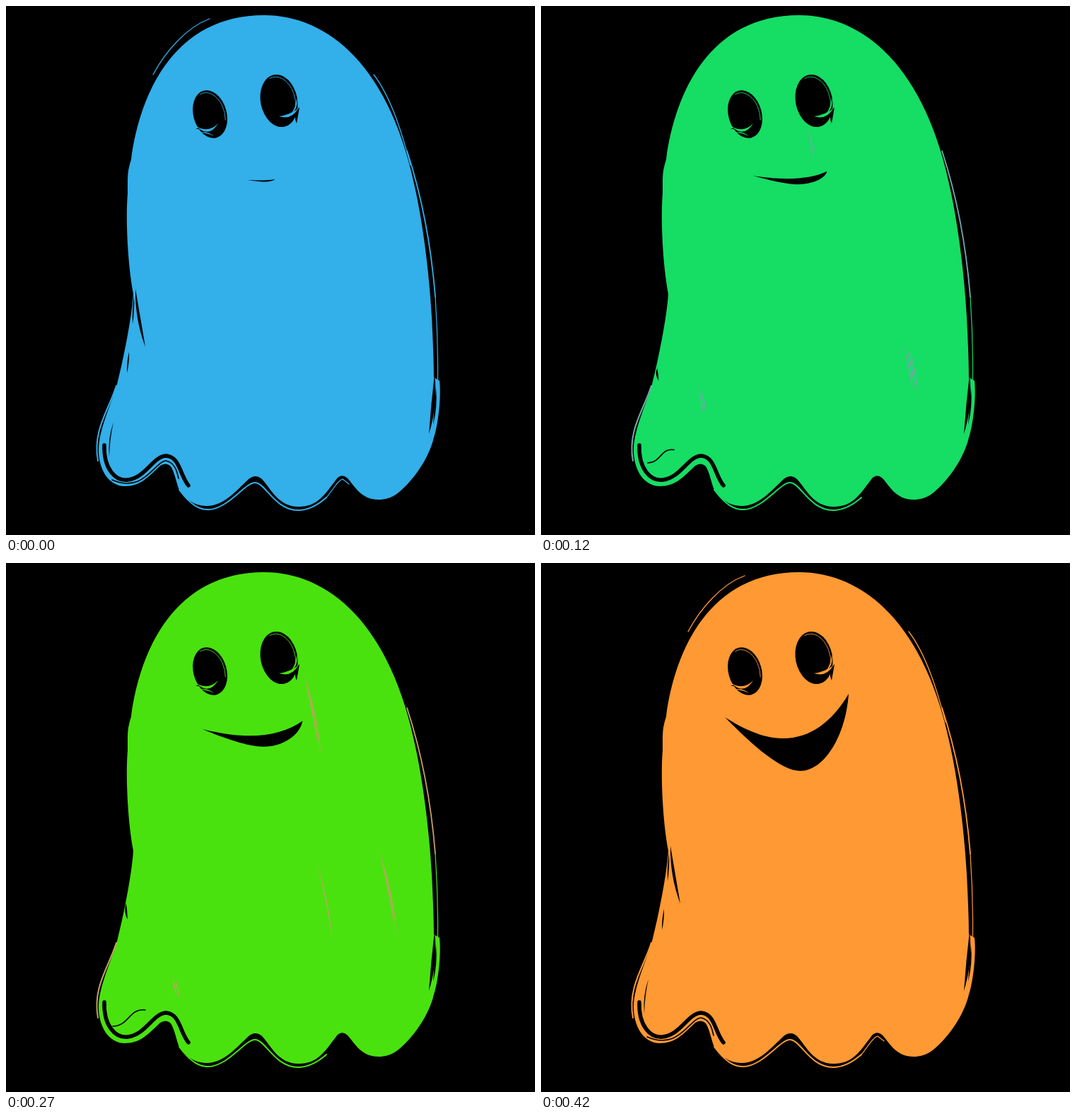
An HTML page with a canvas for the animation above (0.45 s loop, 748 px wide and 748 px high).

```html
<!DOCTYPE html>
<html lang="en">
<head>
<meta charset="utf-8">
<title>Ghost</title>
<style>
html, body { margin: 0; width: 100%; height: 100%; overflow: hidden; background: #000; }
canvas { display: block; }
</style>
</head>
<body>
<canvas id="stage" width="748" height="748"></canvas>
<script>
const ctx = document.getElementById('stage').getContext('2d');
const STEP = 30, STEPS = 15, HALF = 7;
const BLUE = [51, 175, 233], GREEN = [0, 255, 0], ORANGE = [255, 153, 51], INK = '#000';

const body = new Path2D(`M365 13C455 13 545 85 580 265
  C591 318 599 385 602 440C604 480 605 505 605 525L613 530
  C616 560 609 600 605 610C598 640 575 672 555 688C545 696 535 698 527 698
  C500 698 492 676 482 667Q475 661 468 668C450 692 440 708 414 708
  C385 708 375 683 362 669Q353 661 343 669C327 684 308 707 284 707
  C262 707 250 692 244 682C240 670 237 655 232 650Q226 645 218 650
  C200 667 190 679 168 679C145 679 131 655 131 628C131 600 148 565 157 535
  C166 500 178 440 180 407C172 365 169 300 172 265L172 245Q172 232 177 217
  C190 120 240 13 365 13Z`);
const tailFold = new Path2D('M139 621C138 655 155 672 172 670C198 667 208 636 227 636C246 638 246 664 258 678');
const hemEcho = new Path2D('M245 684C262 707 274 712 286 712C313 712 338 674 352 674C367 674 380 713 413 713C430 713 445 702 453 695');
const sideEcho = new Path2D('M567 205C590 275 602 350 607 411');
const lowSideEcho = new Path2D('M607 411C611 470 612 540 608 575');
const tailEcho = new Path2D('M156 537C146 570 122 600 130 643');
const crownEcho = new Path2D('M288 18C255 30 225 65 208 97M520 97C545 130 560 180 572 225');
const hemEnd = new Path2D('M453 695C462 684 470 670 476 669L485 676');
const innerFold = new Path2D('M150 670C195 690 210 644 226 643C240 646 242 660 244 668');

// Each sketch holds from its step: a crease height, a tail curl and
// bundles of streaks (x, y, length, strands).
const sketches = [
  { from: 2, crease: 512, curl: 37, streaks: [[377, 172, 48, 1], [222, 540, 38, 2], [513, 482, 60, 3]] },
  { from: 5, crease: 428, curl: 58, streaks: [[516, 188, 165, 2], [528, 278, 170, 1], [555, 272, 172, 3]] },
  { from: 9, crease: 481, curl: 46, streaks: [[420, 155, 110, 2], [527, 405, 112, 2], [440, 425, 110, 1], [235, 585, 28, 2]] },
  { from: 11, crease: 537, curl: 24, streaks: [[318, 120, 44, 2], [208, 495, 46, 2]] }
];

const mouthPoses = [
  { left: [341, 246], right: [380, 245], upper: 246.5, lower: 248.5 },
  { left: [285, 238], right: [413, 230], upper: 243.5, lower: 253.5 },
  { left: [260, 218], right: [435, 185], upper: 248, lower: 294 }
];

const mix = (a, b, k) => a + (b - a) * k;
const mixColor = (a, b, k) => `rgb(${a.map((v, i) => Math.round(mix(v, b[i], k))).join()})`;

function seeded(seed) {
  return () => {
    const v = Math.sin(++seed * 12.9898) * 43758.5453;
    return v - Math.floor(v);
  };
}

function line(path, color, width) {
  ctx.strokeStyle = color;
  ctx.lineWidth = width;
  ctx.stroke(path);
}

// Curved stroke that tapers to a point at both ends.
function slash(x1, y1, x2, y2, width, bend, color) {
  const len = Math.hypot(x2 - x1, y2 - y1);
  const nx = (y1 - y2) / len, ny = (x2 - x1) / len;
  const mx = (x1 + x2) / 2, my = (y1 + y2) / 2;
  const out = 2 * bend + width, back = 2 * bend - width;
  ctx.fillStyle = color;
  ctx.beginPath();
  ctx.moveTo(x1, y1);
  ctx.quadraticCurveTo(mx + nx * out, my + ny * out, x2, y2);
  ctx.quadraticCurveTo(mx + nx * back, my + ny * back, x1, y1);
  ctx.fill();
}

function drawEye(x, y, rx, ry, turn, color) {
  ctx.save();
  ctx.translate(x, y);
  ctx.rotate(turn);
  ctx.fillStyle = INK;
  ctx.beginPath();
  ctx.ellipse(0, 0, rx, ry, 0, 0, 2 * Math.PI);
  ctx.fill();
  ctx.strokeStyle = color;
  ctx.lineWidth = 0.8;
  ctx.beginPath();
  ctx.ellipse(-1, 1, rx - 2, ry - 2, 0, -1.8, 0.4);
  ctx.stroke();
  ctx.restore();
}

function drawEyes(color) {
  drawEye(288.5, 153, 23.5, 34.5, -0.27, color);
  slash(268, 174, 304, 182, 5, -5, INK);
  slash(269, 170, 300, 166, 3.5, 8, color);
  slash(273, 179, 294, 184, 1.5, -2, color);

  drawEye(386, 134, 26, 37.5, -0.2, color);
  slash(415, 143, 411, 166, 4, 2, INK);
  slash(386, 156, 413, 145, 4, 4, color);
  slash(411, 130, 402, 154, 2, -3, color);
}

function drawMouth(step) {
  const late = step > HALF;
  const [a, b] = late ? mouthPoses.slice(1) : mouthPoses;
  const k = late ? step / HALF - 1 : 1 - (1 - step / HALF) ** 1.6;
  const rise = late ? k ** 1.5 : k;
  const corner = side => [mix(a[side][0], b[side][0], k), mix(a[side][1], b[side][1], rise)];
  const [lx, ly] = corner('left'), [rx, ry] = corner('right');
  const ux = mix(lx, rx, 0.47), uy = mix(a.upper, b.upper, rise);
  const bx = mix(lx, rx, 0.61), by = mix(a.lower, b.lower, rise);
  ctx.fillStyle = INK;
  ctx.beginPath();
  ctx.moveTo(lx, ly);
  ctx.bezierCurveTo(mix(lx, bx, 0.37), mix(ly, by, 0.53), mix(lx, bx, 0.75), by, bx, by);
  ctx.bezierCurveTo(mix(bx, rx, 0.49), by, mix(bx, rx, 0.94), mix(by, ry, 0.45), rx, ry);
  ctx.bezierCurveTo(mix(ux, rx, 0.75), mix(ry, uy, 0.63), mix(ux, rx, 0.41), uy, ux, uy);
  ctx.bezierCurveTo(mix(ux, lx, 0.37), uy, mix(ux, lx, 0.73), mix(ly, uy, 0.47), lx, ly);
  ctx.fill();
}

function drawSketch({ from, crease, curl, streaks }, accent) {
  const random = seeded(from);
  for (const [x, y, length, strands] of streaks) {
    for (let i = 0; i < strands; i++) {
      const top = y + i * length * 0.1 * random(), left = x + i * 4;
      slash(left, top, left + length * 0.2, top + length, 1.6, -length * 0.02, accent);
    }
  }
  const creaseX = 179 - (crease - 430) * 0.18;
  slash(creaseX, crease, creaseX + 2, crease + 32 - (crease - 428) * 0.17, 3, 1, INK);

  const curlY = 609 + curl, midX = 151 + curl / 2, endY = curlY - curl / 2;
  const swirl = new Path2D();
  swirl.moveTo(151, curlY);
  swirl.bezierCurveTo(midX, curlY, midX, endY - 3, 151 + curl, endY);
  line(swirl, INK, 1.6);
}

function drawRestMarks(color) {
  line(crownEcho, color, 1.3);
  line(hemEnd, color, 1.2);
  line(innerFold, INK, 1.6);
  slash(183, 400, 197, 482, 4, 2, INK);
  slash(181, 410, 179, 450, 2, 0, INK);
  slash(174, 489, 171, 519, 2, 0, INK);
  slash(152, 588, 146, 638, 1.5, 2, INK);
}

function draw(step) {
  const color = step < HALF
    ? mixColor(BLUE, GREEN, step / HALF)
    : mixColor(GREEN, ORANGE, step / HALF - 1);
  const accent = mixColor(BLUE, ORANGE, Math.min(1, step / 12.3));
  const resting = step < sketches[0].from || step === STEPS - 1;

  ctx.fillStyle = INK;
  ctx.fillRect(0, 0, 748, 748);
  ctx.fillStyle = color;
  ctx.fill(body);
  line(tailFold, INK, 5.5);
  line(hemEcho, color, 2);
  line(sideEcho, accent, 1.8);
  line(lowSideEcho, color, 1.2);
  line(tailEcho, accent, 2);
  slash(606, 520, 598, 605, 5, -2, INK);
  slash(608, 540, 604, 592, 2.5, -1, INK);
  slash(586, 655, 554, 690, 2, -2, INK);

  if (resting) drawRestMarks(color);
  else drawSketch(sketches.findLast(s => s.from <= step), accent);
  drawEyes(color);
  drawMouth(step);
}

function tick() {
  draw(Math.floor(performance.now() / STEP) % STEPS);
  requestAnimationFrame(tick);
}
ctx.lineCap = 'round';
tick();
</script>
</body>
</html>
```
